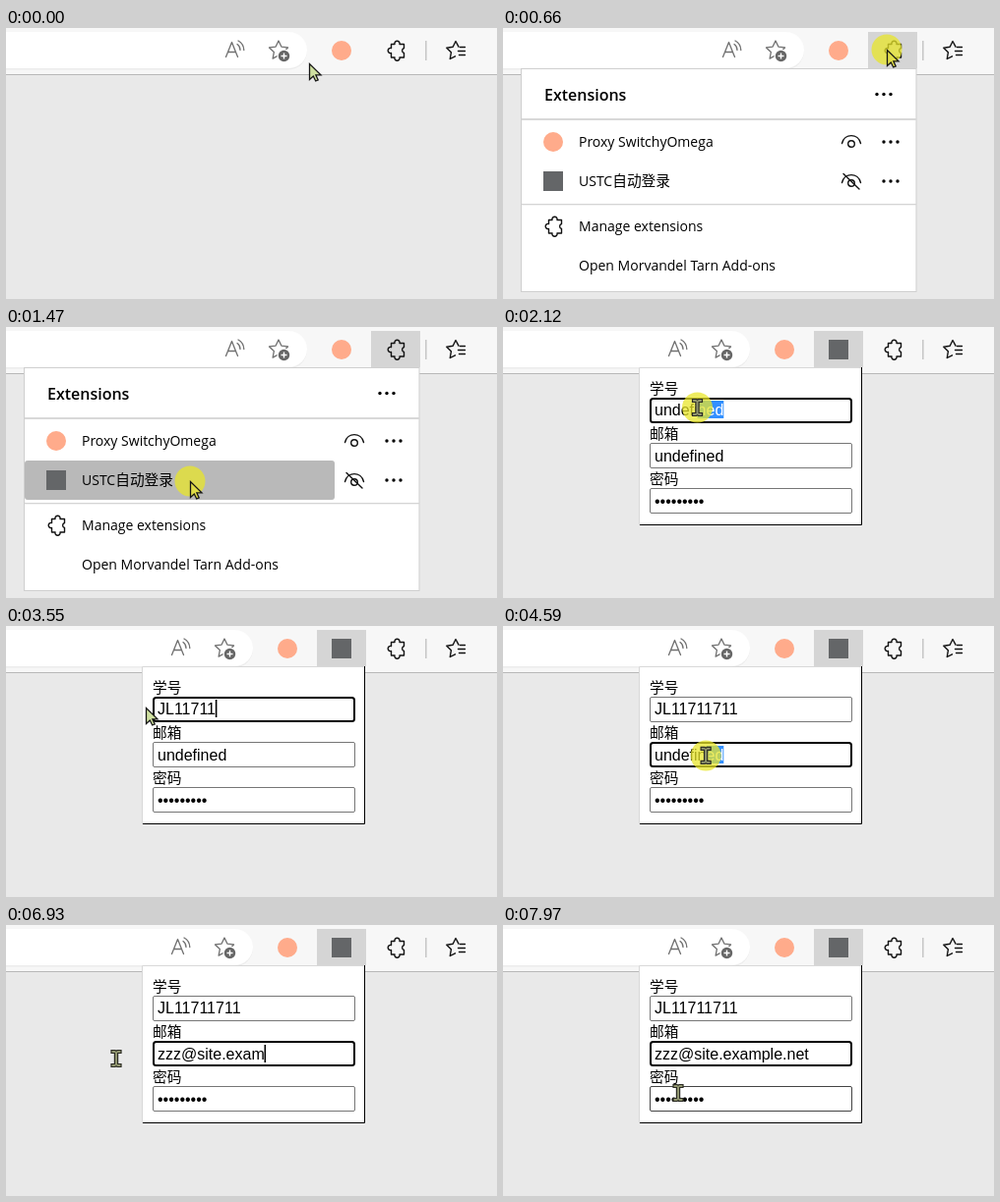
An HTML page for the animation above (8 s loop, 499x276 px).

```html
<!DOCTYPE html>
<html lang="en">
<head>
<meta charset="utf-8">
<title>Extension form</title>
<style>
html, body { margin: 0; width: 100%; height: 100%; overflow: hidden; background: #e9e9e9; }
svg { display: block; width: 499px; height: 276px; }
text { white-space: pre; }
.ui { font: 14px "Open Sans", "Noto Sans", sans-serif; fill: #000; }
.head { font-size: 16px; font-weight: 600; }
.cjk { font: 14.7px "Noto Sans CJK SC", "Noto Sans CJK", sans-serif; fill: #000; }
.input { font: 16px "Liberation Sans", Arial, sans-serif; fill: #000; }
.line { fill: none; stroke: #111; stroke-width: 1.4; stroke-linecap: round; stroke-linejoin: round; }
.soft { stroke: #707070; stroke-width: 1.3; }
</style>
</head>
<body>
<svg viewBox="0 0 499 276">
  <defs>
    <path id="puzzle" class="line" d="M-5.5-6.5H-2a2.6 2.6 0 1 1 5 0H7.5V-2.5a2.6 2.6 0 0 0 0 5V7H3a2.6 2.6 0 1 1-5 0H-5.5V2.5a2.6 2.6 0 1 1 0-5Z"/>
    <path id="eye" class="line" d="M-9.5 1.5C-7-9 7-9 9.5 1.5M3.3 2a3.3 3.3 0 1 1-6.6 0a3.3 3.3 0 1 1 6.6 0Z"/>
    <g id="dots"><circle cx="-7" r="1.7"/><circle r="1.7"/><circle cx="7" r="1.7"/></g>
    <circle id="disc" r="10" fill="#ffab8b"/>
    <rect id="tile" x="-10" y="-10" width="20" height="20" fill="#646668"/>
  </defs>

  <rect width="499" height="276" fill="#e9e9e9"/>
  <rect width="499" height="47" fill="#f7f7f7"/>
  <rect y="47" width="499" height="1" fill="#b8b8b8"/>
  <g id="bar">
    <rect x="-40" y="4.5" width="346" height="38" rx="19" fill="#ececec"/>
    <rect x="-40" y="4" width="346" height="37" rx="18.5" fill="#fff"/>
    <path class="line soft" d="M223.5 29.5L229.5 14.5L235.5 29.5M225.6 24.5H233.4M235 16.5Q238 18.5 238 22.5M236 13Q241.5 16 241.8 22.5"/>
    <path id="star" class="line soft"/>
    <circle cx="282.5" cy="28.5" r="7" fill="#fff"/>
    <circle cx="282.5" cy="28.5" r="5.7" fill="#666"/>
    <path d="M279.5 28.5h6M282.5 25.5v6" stroke="#fff" stroke-width="1.4"/>
    <use href="#disc" x="341" y="23"/>
  </g>
  <rect id="glow" y="4" width="50" height="37" fill="#d5d5d5"/>
  <use id="pin" href="#tile" x="341" y="23"/>
  <use href="#puzzle" x="397" y="23"/>
  <rect x="426" y="13" width="1.6" height="20" fill="#c9c9c9"/>
  <path class="line" d="M460 19.2L457 13.5L454.2 19.3L447.8 20.2L452.4 24.8L451.3 31.5L456.5 28.8M461.5 19.5H466.5M459.5 23.5H466.5M460.5 27.5H466.5"/>

  <g id="menu">
    <rect x="18.5" y="41.5" width="401.5" height="227" fill="#fff" stroke="#cfcfcf"/>
    <rect x="19" y="92" width="401" height="2" fill="#d8d8d8"/>
    <rect x="19" y="179" width="401" height="1.3" fill="#d4d4d4"/>
    <rect id="hover" x="19" width="315" height="40" rx="3"/>
    <text class="ui head" x="42" y="74">Extensions</text>
    <text class="ui" x="77" y="121">Proxy SwitchyOmega</text>
    <text class="ui" x="77" y="161">USTC<tspan class="cjk">自动登录</tspan></text>
    <text class="ui" x="77" y="207">Manage extensions</text>
    <text class="ui" x="77" y="247">Open Morvandel Tarn Add-ons</text>
    <use href="#disc" x="51" y="116"/>
    <use href="#tile" x="51" y="156"/>
    <use href="#puzzle" x="52" y="202"/>
    <use href="#dots" x="387" y="67.5"/>
    <use href="#dots" x="394" y="116"/>
    <use href="#dots" x="394" y="156"/>
    <use href="#eye" x="354" y="116"/>
    <use href="#eye" x="354" y="156"/>
    <path class="line" d="M346 148.5L362 164"/>
  </g>

  <g id="form">
    <rect x="138.5" y="41" width="226" height="161" fill="#fff"/>
    <path d="M138.5 202V41.5H364" fill="none" stroke="#d8d8d8"/>
    <path d="M139 201.5H364.5V41" fill="none" stroke="#000"/>
  </g>

  <circle id="press" r="15.5" fill="#e8e628" fill-opacity=".74"/>
  <path id="arrow" d="M.5 .5V16.5L4.3 13L6.7 18L9.2 16.9L6.9 11.9H12Z" stroke="#151515" stroke-width="1.3"/>
  <path id="beam" d="M-5-8.5H-1L0-7.8L1-8.5H5V-5.5H1.6V5.5H5V8.5H1L0 7.8L-1 8.5H-5V5.5H-1.6V-5.5H-5Z" fill="#90956f" stroke="#2c2c24" stroke-width="1.2"/>
</svg>
<script>
const LOOP = 8000, TEXT_X = 154, OLD = 'undefined';
const $ = id => document.getElementById(id);
const set = (el, attrs) => { for (const k in attrs) el.setAttribute(k, attrs[k]); };
const show = (el, on) => { el.style.display = on ? '' : 'none'; };
const within = (t, a, b) => t >= a && t < b;
const add = (parent, tag, attrs = {}, content = '') => {
  const el = document.createElementNS('http://www.w3.org/2000/svg', tag);
  set(el, attrs);
  el.textContent = content;
  return parent.appendChild(el);
};

const pen = document.createElement('canvas').getContext('2d');
pen.font = '16px "Liberation Sans", Arial, sans-serif';
const widthOf = s => pen.measureText(s).width;

const starPoints = Array.from({ length: 10 }, (_, i) => {
  const r = i % 2 ? 4.9 : 10, a = i * Math.PI / 5 - Math.PI / 2;
  return `${277 + r * Math.cos(a)} ${23 + r * Math.sin(a)}`;
});
set($('star'), { d: `M${starPoints.join('L')}Z` });

const makeField = (label, y, top) => {
  const form = $('form');
  add(form, 'text', { class: 'cjk', x: 149, y: y - 4.5 }, label);
  const box = add(form, 'rect', { fill: '#fff' });
  const mark = add(form, 'rect', { y: top, height: 18, fill: '#3390ff' });
  const text = add(form, 'text', { class: 'input', x: TEXT_X, y: top + 15 });
  return {
    y, box, mark,
    plain: add(text, 'tspan'),
    picked: add(text, 'tspan', { fill: '#fff' }),
    caret: add(form, 'rect', { y: top, width: 1.6, height: 18 })
  };
};
const idField = makeField('学号', 72, 75);
const mailField = makeField('邮箱', 118, 122);
const passField = makeField('密码', 164, 168);

const drawField = (f, value, { focus = false, hover = false, from = value.length, caret = false } = {}) => {
  const inset = focus ? 1 : 0.5;
  set(f.box, {
    x: 149 + inset, y: f.y + inset, width: 206 - 2 * inset, height: 26 - 2 * inset, rx: focus ? 2.5 : 1.5,
    stroke: focus ? '#000' : hover ? '#444' : '#767676', 'stroke-width': 2 * inset
  });
  const start = widthOf(value.slice(0, from)), end = widthOf(value);
  f.plain.textContent = value.slice(0, from);
  f.picked.textContent = value.slice(from);
  set(f.mark, { x: TEXT_X + start, width: end - start });
  set(f.caret, { x: TEXT_X + end - 0.2 });
  show(f.caret, caret);
};

// One keystroke per listed time
const typed = (word, times, t) => word.slice(0, times.filter(k => t >= k).length);
const idKeys = [2770, 3000, 3130, 3260, 3290, 3420, 3550, 3680, 3810, 3940];
const mailKeys = [5370, 5600, 5630, 6120, 6250, 6280, 6380, 6410, 6410, 6510, 6540, 6670,
  6930, 7060, 7160, 7320, 7420, 7450, 7580, 7680];

// time, x, y
const path = [
  [240, 308, 36], [530, 390, 22], [920, 390, 22], [1310, 187, 157], [1800, 187, 157],
  [1960, 226, 83], [1990, 226, 83], [2120, 197.5, 82], [2250, 142, 83], [4170, 142, 83],
  [4430, 228, 131], [4490, 228, 131], [4850, 112, 136], [7910, 112, 136], [7970, 178, 171]
];
const pointer = t => {
  if (t <= path[0][0]) return path[0].slice(1);
  const i = path.findIndex(k => k[0] > t);
  if (i < 0) return path[path.length - 1].slice(1);
  const [t0, x0, y0] = path[i - 1], [t1, x1, y1] = path[i];
  const p = (t - t0) / (t1 - t0), e = p * p * (3 - 2 * p);
  return [x0 + (x1 - x0) * e, y0 + (y1 - y0) * e];
};

const refresh = t => {
  const k = Math.floor((t - 10) / 130) * 130 + 10;
  return Math.max(0, t - k >= 30 ? k + 30 : k);
};

// Index of the first character right of the pointer
const pickedFrom = x => {
  let n = 0;
  while (n < OLD.length && TEXT_X + widthOf(OLD.slice(0, n + 1)) - 3 < x) n++;
  return n;
};

function draw(time) {
  const t = refresh(time), [x, y] = pointer(t);
  const pinned = t >= 1570, menuOpen = within(t, 560, 1570), formOpen = t >= 1600;
  const pressed = within(t, 560, 690) || within(t, 1310, 1570) || within(t, 1960, 2380) || within(t, 4450, 4950);

  set($('bar'), { transform: `translate(${pinned ? -55 : 0})` });
  set($('glow'), { x: pinned ? 316 : 371 });
  show($('glow'), t >= 430);
  show($('pin'), pinned);
  show($('menu'), menuOpen);
  show($('form'), formOpen);

  const row = Math.floor((y - 96) / 40);
  show($('hover'), x < 334 && (row === 0 || row === 1));
  set($('hover'), { y: 96 + row * 40, fill: pressed ? '#b9b9b9' : '#dadada' });

  const idFocus = within(t, 1960, 4450), mailFocus = t >= 4450;
  const idText = t < 2770 ? OLD : typed('JL11711711', idKeys, t);
  const mailText = t < 5370 ? OLD : typed('zzz@site.example.net', mailKeys, t);
  drawField(idField, idText, {
    focus: idFocus,
    from: within(t, 1960, 2770) ? pickedFrom(x) : idText.length,
    caret: within(t, 2770, 4200)
  });
  drawField(mailField, mailText, {
    focus: mailFocus,
    from: within(t, 4450, 5370) ? pickedFrom(x) : mailText.length,
    caret: within(t, 5370, 5890) || within(t, 6120, 7940)
  });
  drawField(passField, '•'.repeat(9), { hover: t >= 7940 });

  const at = { transform: `translate(${x} ${y})` };
  const beam = within(t, 1930, 2380) || (t >= 4200 && (x > 149 || t >= 4450));
  set($('press'), at);
  show($('press'), pressed);
  set($('arrow'), { ...at, fill: pressed ? '#dfdc48' : '#cfe0a0' });
  show($('arrow'), !beam);
  set($('beam'), at);
  show($('beam'), beam);
}

const begin = performance.now();
const tick = () => {
  draw((performance.now() - begin) % LOOP);
  requestAnimationFrame(tick);
};
tick();
</script>
</body>
</html>
```
